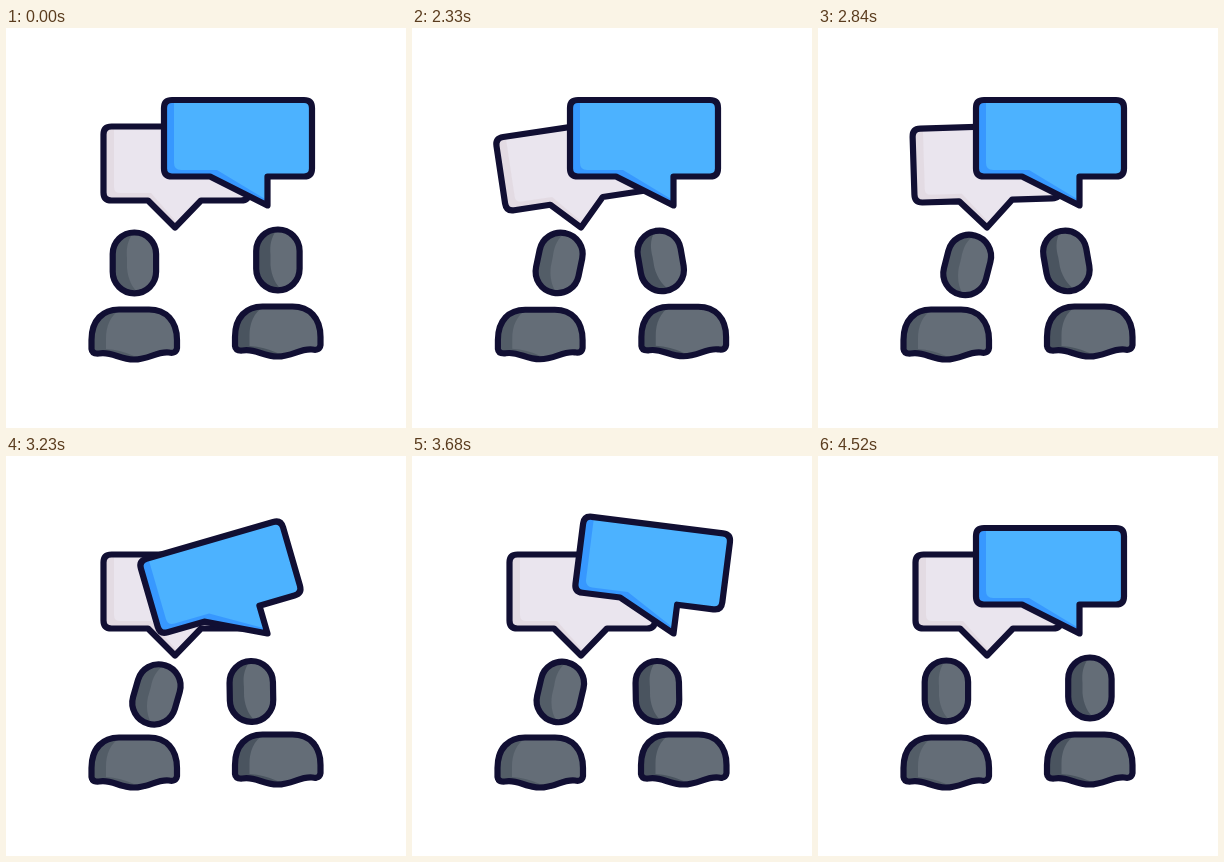
An HTML page that plays this animation: 400x400 px, repeating every 4.55 s.

```html
<!DOCTYPE html>
<html lang="en">
<head>
<meta charset="utf-8">
<title>Conversation</title>
<style>
  html, body { margin: 0; width: 100%; height: 100%; overflow: hidden; background: #fff; }
  svg { display: block; width: 100vw; height: 100vh; }
  .line { fill: none; stroke: #110f33; stroke-width: 6.2; stroke-linejoin: round; }
  .skin { fill: #646d77; }
</style>
</head>
<body>
<svg viewBox="0 0 400 400">
  <defs>
    <rect id="headShape" x="106.700" y="204.500" width="43.400" height="60.800" rx="21.500"/>
    <path id="bodyShape" d="M85.500 321V312C85.500 292 97 281.500 113 281.500H143C160 281.500 171 293 171 312V320Q170 326 163 324.500C151 323 143 331.500 128 331.500S106 323 93 325.500Q86 326 85.500 321z"/>
    <path id="greyShape" d="M105.500 98.500H235q8 0 8 8V164.500q0 8-8 8H195L169 199.500 142 172.500H105.500q-8 0-8-8V106.500q0-8 8-8z"/>
    <path id="blueShape" d="M166 72H298q8 0 8 8V140.500q0 8-8 8H261.500V177.500L204 148.500H166q-8 0-8-8V80q0-8 8-8z"/>
    <clipPath id="headClip"><use href="#headShape"/></clipPath>
    <clipPath id="bodyClip"><use href="#bodyShape"/></clipPath>
    <clipPath id="greyClip"><use href="#greyShape"/></clipPath>
    <clipPath id="blueClip"><use href="#blueShape"/></clipPath>
    <g id="head">
      <use href="#headShape"/>
      <path clip-path="url(#headClip)" class="skin" d="M130 202C122 210 120 219 121 230V240C122 252 127 262 136 268H155V202z"/>
      <use href="#headShape" class="line"/>
    </g>
    <g id="body">
      <use href="#bodyShape"/>
      <path clip-path="url(#bodyClip)" class="skin" d="M119 279C105 285 100 297 100 311V321Q115 322 128 328T180 328V279z"/>
      <use href="#bodyShape" class="line"/>
    </g>
  </defs>

  <g id="greyBubble">
    <use href="#greyShape" fill="#e3dbe3"/>
    <path clip-path="url(#greyClip)" fill="#eae5ee" d="M108 90H250V180H190L174 198 145 165H114q-6 0-6-6z"/>
    <use href="#greyShape" class="line"/>
  </g>
  <g id="blueBubble">
    <use href="#blueShape" fill="#3798ff"/>
    <path clip-path="url(#blueClip)" fill="#4cb2ff" d="M168 60H320V155H259V171L211 142H175q-7 0-7-7z"/>
    <use href="#blueShape" class="line"/>
  </g>
  <g fill="#535d67">
    <use id="leftBody" href="#body"/>
    <use id="leftHead" href="#head"/>
  </g>
  <g fill="#4a545f" transform="translate(143.500 -3)">
    <use id="rightBody" href="#body"/>
    <use id="rightHead" href="#head"/>
  </g>
</svg>
<script>
const LOOP = 4550;

const clamp = x => Math.min(1, Math.max(0, x));
const progress = (t, from, to) => clamp((t - from) / (to - from));
const ease = (t, from, to) => (1 - Math.cos(Math.PI * progress(t, from, to))) / 2;

// Two full swings that quicken as they fade.
function swing(t) {
  const p = progress(t, 0, 1060);
  return -28 * Math.exp(-1.54 * p) * Math.sin(4 * Math.PI * p ** 1.345);
}

// One small stretch and squash.
function pulse(t) {
  const p = progress(t, 0, 400);
  return .06 * Math.sin(2 * Math.PI * p) * (1 - p);
}

const place = (id, transform) =>
  document.getElementById(id).setAttribute('transform', transform);

const placeHead = (id, x, y, angle) =>
  place(id, `translate(${x} ${y}) rotate(${angle} 128.4 235)`);

function draw(t) {
  place('greyBubble', `rotate(${swing(t - 2000)} 169 199.5)`);
  place('blueBubble', `rotate(${swing(t - 3097)} 261.5 177.5)`);

  const lean = ease(t, 1995, 2360) - ease(t, 3950, 4400);
  const nod = ease(t, 2360, 3230) - ease(t, 3230, 3950);
  const turn = ease(t, 2840, 3230) - ease(t, 3950, 4400);
  placeHead('leftHead', 19 * lean + 3 * nod, 3.5 * nod, 12 * lean + 4 * nod);
  placeHead('rightHead', -23.5 * lean - 3 * turn, lean + 2.5 * turn, -10 * lean + 9 * turn);

  const scale = 1 + pulse(t - 2000) + pulse(t - 3980);
  for (const id of ['leftBody', 'rightBody'])
    place(id, `translate(128 306) scale(${scale}) translate(-128 -306)`);
}

const start = performance.now();
function tick() {
  draw((performance.now() - start) % LOOP);
  requestAnimationFrame(tick);
}
tick();
</script>
</body>
</html>
```
